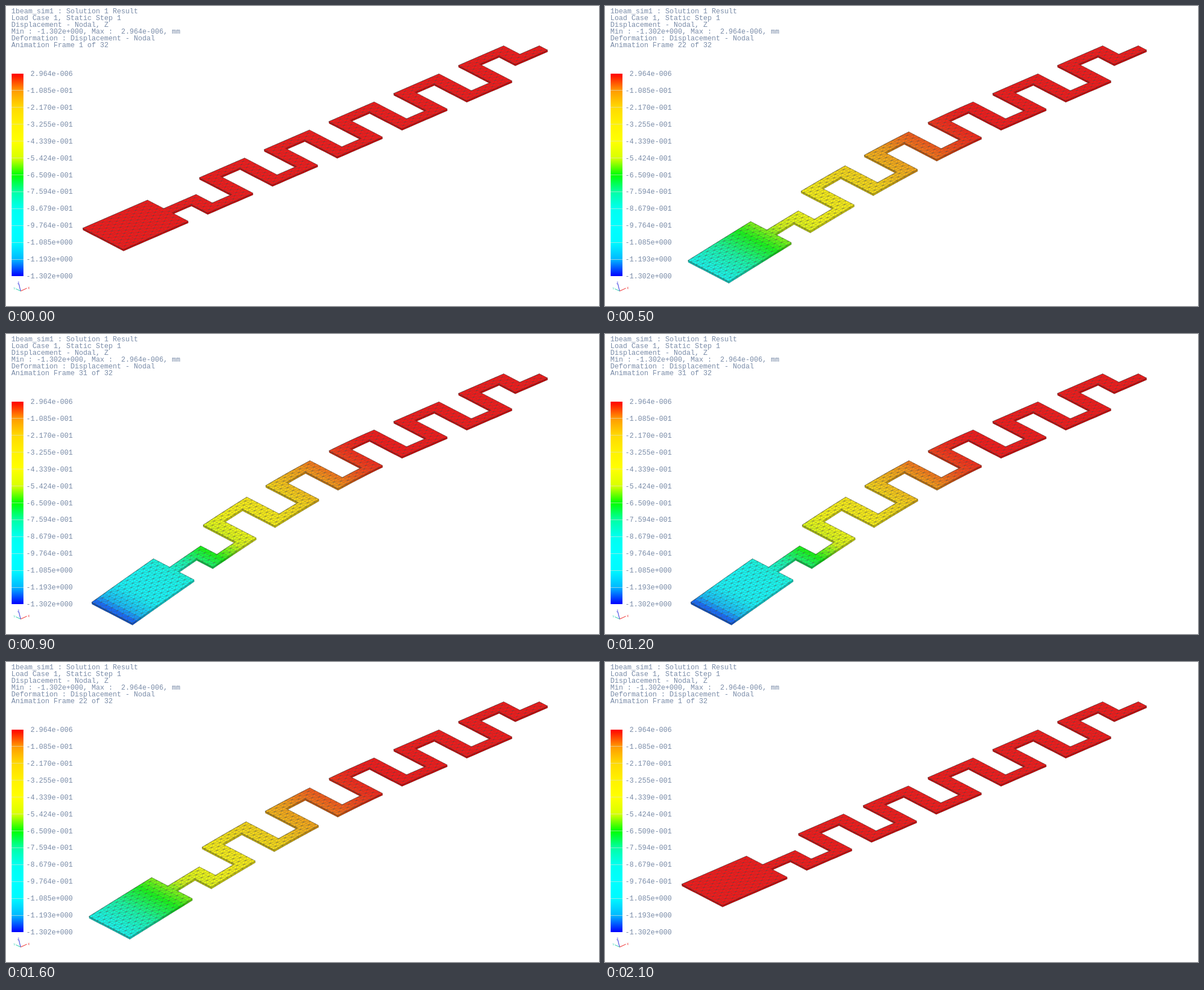
Write an HTML page with a canvas that moves like this. It is 1053 px wide and 532 px high and loops after 2200 ms.

```html
<!DOCTYPE html>
<html lang="en">
<head>
<meta charset="utf-8">
<title>Beam displacement</title>
<style>
html, body { margin: 0; width: 100%; height: 100%; overflow: hidden; background: #fff; }
canvas { display: block; }
</style>
</head>
<body>
<canvas id="stage" width="1053" height="532"></canvas>
<script>
const ctx = document.getElementById('stage').getContext('2d');
const STEP = 100;
const RISE = [1, 7, 13, 14, 15, 22, 23, 24, 30, 31, 32];
const SEQUENCE = [...RISE, ...RISE.slice().reverse()];
const PEAK = 1.302;
const INK = '#7a8ca8';
const FONT = '12.5px "Liberation Mono", monospace';

// Legend colours at equal steps from zero to the largest displacement
const RAMP = [
  [255, 0, 0], [255, 155, 0], [255, 218, 0], [255, 242, 0], [255, 255, 0],
  [216, 255, 0], [0, 255, 0], [0, 255, 165], [0, 255, 240], [0, 255, 255],
  [0, 250, 255], [0, 185, 255], [0, 0, 255]
];
const LABELS = ['2.964e-006', '-1.085e-001', '-2.170e-001', '-3.255e-001',
  '-4.339e-001', '-5.424e-001', '-6.509e-001', '-7.594e-001', '-8.679e-001',
  '-9.764e-001', '-1.085e+000', '-1.193e+000', '-1.302e+000'];

const rgb = (c, k = 1, lift = 0) => `rgb(${c.map(x => Math.round(x * k + lift)).join()})`;

function rampColor(t) {
  const x = Math.min(Math.max(t, 0), 1) * (RAMP.length - 1);
  const i = Math.min(Math.floor(x), RAMP.length - 2);
  return RAMP[i].map((a, n) => a + (RAMP[i + 1][n] - a) * (x - i));
}

// Plan of the part, measured in strip widths: u along the beam, v across it
function inside(u, v) {
  const mid = v > 2 && v < 3;
  if (u < 5) return true;
  if (u < 6.5 || u > 32.5) return mid;
  const p = (u - 6.5) % 5;
  if (p < 1) return u < 7.5 ? v > 2 : u > 31.5 ? v < 3 : true;
  if (p < 2.5) return v > 4;
  if (p < 3.5) return true;
  return v < 1;
}

function makeTicks() {
  const stops = [0, 5];
  for (let u = 6.5; u < 33; u += 2.5) stops.push(u, u + 1);
  stops.push(34);
  const out = [0];
  for (let i = 1; i < stops.length; i++) {
    const a = stops[i - 1], len = stops[i] - a, n = Math.round(len * 3);
    for (let k = 1; k <= n; k++) out.push(a + len * k / n);
  }
  return out;
}

const us = makeTicks();
const vs = Array.from({ length: 16 }, (_, j) => j / 3);
const has = (i, j) => i >= 0 && j >= 0 && i < us.length - 1 && j < vs.length - 1 &&
  inside((us[i] + us[i + 1]) / 2, (vs[j] + vs[j + 1]) / 2);
const cells = [];
const rim = [];
for (let i = us.length - 2; i >= 0; i--) {
  for (let j = 0; j < vs.length - 1; j++) {
    if (!has(i, j)) continue;
    cells.push([i, j]);
    if (!has(i - 1, j)) rim.push([i, j, i, j + 1, true]);
    if (!has(i, j + 1)) rim.push([i, j + 1, i + 1, j + 1, true]);
    if (!has(i + 1, j)) rim.push([i + 1, j, i + 1, j + 1, false]);
    if (!has(i, j - 1)) rim.push([i, j, i + 1, j, false]);
  }
}

// Cantilever with a tip load, clamped at u = 22
function sag(u) {
  const x = Math.max(0, 1 - u / 22);
  return (3 * x * x - x * x * x) / 2;
}

function project(u, v, s) {
  const w = sag(u) * s;
  return [136.3 + 23 * u + 14.4 * v + 16.5 * w, 394 - 9.95 * u + 7.45 * v + 84.5 * w];
}

function polygon(points) {
  ctx.beginPath();
  points.forEach(p => ctx.lineTo(p[0], p[1]));
  ctx.closePath();
}

function segment(a, b) {
  ctx.moveTo(a[0], a[1]);
  ctx.lineTo(b[0], b[1]);
}

function drawBeam(s) {
  const grid = us.map(u => vs.map(v => project(u, v, s)));
  const tone = us.map((u, i) => rampColor(sag((u + (us[i + 1] ?? u)) / 2) * s));
  const low = p => [p[0] + 0.4, p[1] + 3.2];

  for (const [i, j, m, n, front] of rim) {
    if (!front) continue;
    const a = grid[i][j], b = grid[m][n];
    polygon([a, b, low(b), low(a)]);
    ctx.fillStyle = rgb(tone[i], 0.75);
    ctx.fill();
    ctx.strokeStyle = 'rgba(60,60,60,.5)';
    ctx.lineWidth = 0.6;
    ctx.stroke();
  }

  for (const [i, j] of cells) {
    polygon([grid[i][j], grid[i + 1][j], grid[i + 1][j + 1], grid[i][j + 1]]);
    ctx.fillStyle = ctx.strokeStyle = rgb(tone[i], 0.9, 22);
    ctx.lineWidth = 0.5;
    ctx.fill();
    ctx.stroke();
  }

  // Triangle mesh with alternating diagonals
  ctx.beginPath();
  for (const [i, j] of cells) {
    const a = grid[i][j], b = grid[i + 1][j], c = grid[i][j + 1], d = grid[i + 1][j + 1];
    segment(a, b);
    segment(a, c);
    if ((i + j) % 2) segment(a, d);
    else segment(b, c);
  }
  ctx.strokeStyle = 'rgba(70,70,70,.5)';
  ctx.lineWidth = 0.65;
  ctx.stroke();

  ctx.beginPath();
  for (const [i, j, m, n] of rim) segment(grid[i][j], grid[m][n]);
  ctx.strokeStyle = 'rgba(60,60,60,.7)';
  ctx.lineWidth = 0.8;
  ctx.stroke();
}

function drawHeader(count) {
  const lines = ['1beam_sim1 : Solution 1 Result', 'Load Case 1, Static Step 1',
    'Displacement - Nodal, Z', `Min : -${PEAK}e+000, Max :  2.964e-006, mm`,
    'Deformation : Displacement - Nodal', `Animation Frame ${count} of 32`];
  ctx.font = FONT;
  ctx.fillStyle = INK;
  ctx.textAlign = 'left';
  lines.forEach((line, i) => ctx.fillText(line, 9.5, 13 + 12 * i));
}

function drawLegend() {
  const top = 120, height = 359, gap = height / (RAMP.length - 1);
  const fill = ctx.createLinearGradient(0, top, 0, top + height);
  RAMP.forEach((c, i) => fill.addColorStop(i / (RAMP.length - 1), rgb(c)));
  ctx.fillStyle = fill;
  ctx.fillRect(10, top, 21, height);
  ctx.textAlign = 'right';
  LABELS.forEach((label, i) => {
    const y = top + gap * i;
    ctx.fillStyle = 'rgba(225,225,215,.65)';
    if (i > 0 && i < LABELS.length - 1) ctx.fillRect(10, Math.floor(y), 21, 1);
    ctx.fillStyle = INK;
    ctx.fillText(label, 118.5, y + 4);
  });
}

function drawTriad() {
  const axes = [
    [22.5, 492, '#2222dd', 'Z', 22, 493],
    [37, 500.5, '#ee2222', 'X', 40.5, 501.5],
    [17.5, 501.5, '#22ccaa', 'Y', 15, 503]
  ];
  ctx.font = '5px "Liberation Sans", sans-serif';
  ctx.textAlign = 'center';
  ctx.lineWidth = 1;
  for (const [x, y, color, name, tx, ty] of axes) {
    ctx.strokeStyle = ctx.fillStyle = color;
    ctx.beginPath();
    segment([26, 505.5], [x, y]);
    ctx.stroke();
    ctx.fillText(name, tx, ty);
  }
}

let shown = 0;
function draw(count) {
  ctx.fillStyle = '#fff';
  ctx.fillRect(0, 0, 1053, 532);
  drawBeam((count - 1) / 31);
  drawHeader(count);
  drawLegend();
  drawTriad();
  shown = count;
}

const start = performance.now();
function tick() {
  const step = Math.floor(Math.max(0, performance.now() - start) / STEP);
  const count = SEQUENCE[step % SEQUENCE.length];
  if (count !== shown) draw(count);
  requestAnimationFrame(tick);
}
tick();
</script>
</body>
</html>
```
